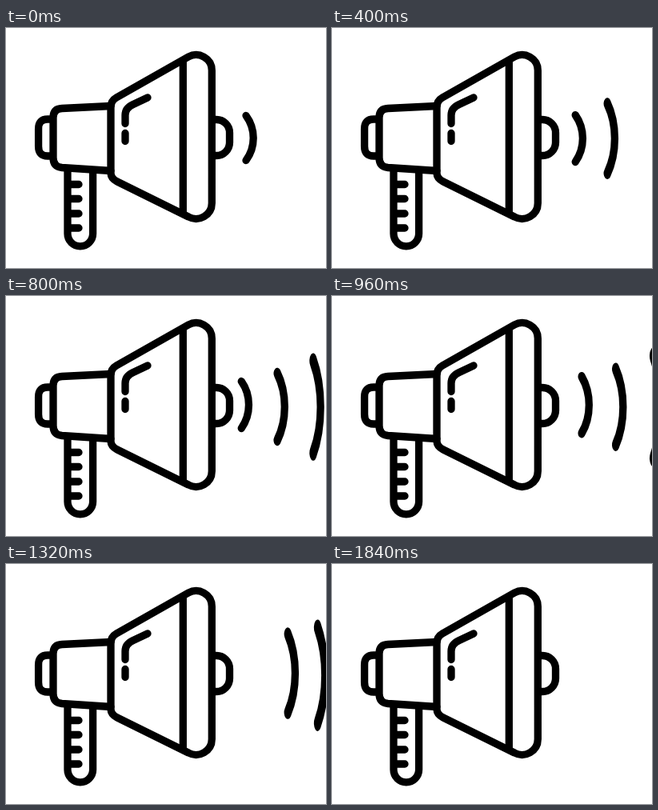
Animation, 400 px wide and 300 px high, one loop 2 s. Source, as an HTML page:

```html
<!DOCTYPE html>
<html lang="en">
<head>
<meta charset="utf-8">
<title>Megaphone</title>
<style>
  html, body { margin: 0; width: 100%; height: 100%; overflow: hidden; background: #fff; }
  svg { display: block; width: 100vw; height: 100vh; }
  path { fill: none; stroke: #000; stroke-width: 9.3; stroke-linecap: round; stroke-linejoin: round; }
  .butt { stroke-linecap: butt; }
</style>
</head>
<body>
<svg viewBox="0 0 400 300">
  <!-- handle -->
  <path class="butt" d="M77 177V257A15.8 15.8 0 0 0 108.6 257V177"/>
  <path d="M78 195.5H91M78 213.5H91M78 232H91M78 250H91"/>
  <!-- back cap and body -->
  <path class="butt" d="M59 114H52Q40.6 114 40.6 126V148Q40.6 160 52 160H59"/>
  <path d="M131 97.5L70 100.5Q59 101 59 112V162Q59 173.5 70 174.5L131 178.5"/>
  <!-- horn -->
  <path d="M131 182V99Q131 91 138 87L228 36C241 29 257.3 38 257.3 53V219C257.3 234 241 243 228 236L139 192Q131 188 131 181Z"/>
  <path class="butt" d="M221.3 40V232"/>
  <path class="butt" d="M257 114.5H263A16.5 16.5 0 0 1 279.5 131V143A16.5 16.5 0 0 1 263 159.5H257"/>
  <!-- highlight -->
  <path d="M177 87L159 95.5Q149 100 149 109V119.5M149 131.5V141.5"/>
  <g id="waves"></g>
</svg>
<script>
  const LOOP = 2000, TICK = 40;
  const HOLDS = [13, 38]; // ticks on which the motion pauses
  const ARC = 'M0 -28A47.2 47.2 0 0 1 0 28', ARC_HALF = 32.5;

  // Each value is [at birth, change per step].
  const waves = [
    { born: 0,  x: [300, 4.42],   y: [137.5, 0.06], half: [32.5, 1.81] },
    { born: 9,  x: [300.3, 3.88], y: [138, 0.05],   half: [32.4, 1.61] },
    { born: 18, x: [289.8, 4.46], y: [136, 0.04],   half: [32.3, 1.76] }
  ];

  const group = document.getElementById('waves');
  for (const wave of waves) {
    wave.el = document.createElementNS('http://www.w3.org/2000/svg', 'path');
    wave.el.setAttribute('d', ARC);
    group.append(wave.el);
  }

  const at = ([start, rate], age) => start + rate * age;

  function draw(time) {
    const tick = Math.floor((time % LOOP) / TICK);
    const step = tick - HOLDS.filter(hold => tick >= hold).length;
    for (const { el, born, x, y, half } of waves) {
      const age = step - born;
      el.style.display = age < 0 ? 'none' : '';
      el.setAttribute('transform',
        `translate(${at(x, age)} ${at(y, age)}) scale(1 ${at(half, age) / ARC_HALF})`);
    }
  }

  const start = performance.now();
  function loop() {
    draw(performance.now() - start);
    requestAnimationFrame(loop);
  }
  loop();
</script>
</body>
</html>
```
